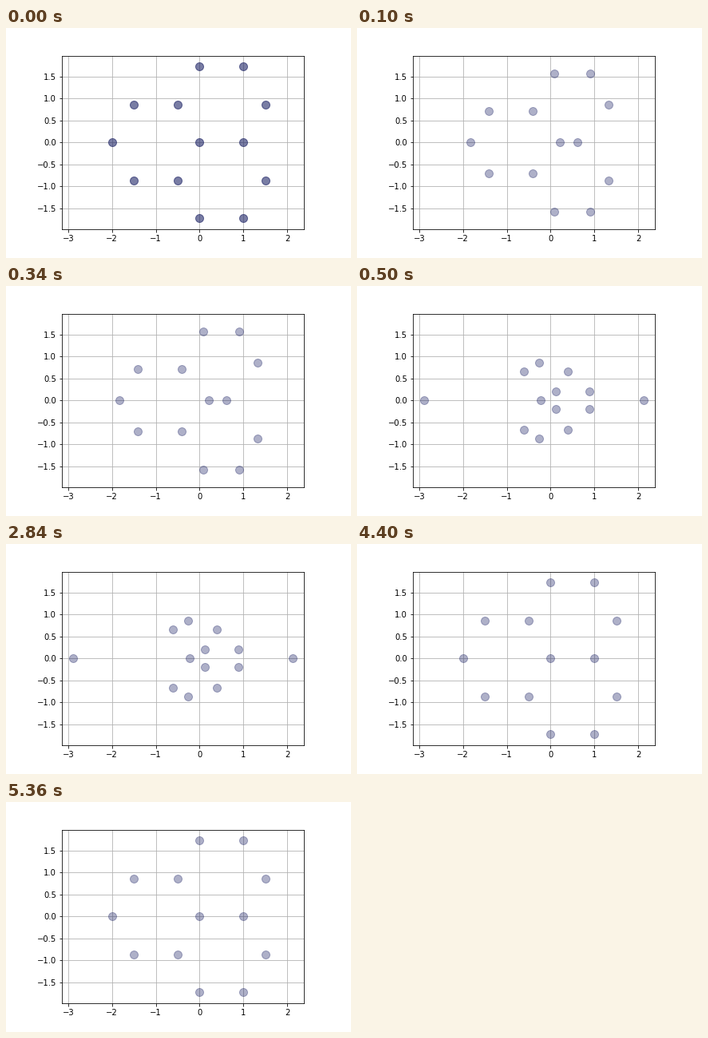
A matplotlib script that plays this animation: 432 px wide and 288 px high, repeating every 6000 ms.

```python
import matplotlib.pyplot as plt
import numpy as np
from matplotlib.animation import FuncAnimation

FRAME_MS = 100
FRAMES = 60
RELAX_START, SETTLE_START, RESET_START = 1, 5, 44
COLOR = "#181e62"
ALPHA = 0.35


def mirrored(axis, upper):
    """Points on the x axis plus a set reflected across it."""
    points = [(x, 0) for x in axis]
    for x, y in upper:
        points += [(x, y), (x, -y)]
    return np.array(points)


H = np.sqrt(3) / 2
lattice = mirrored(
    [-2, 0, 1],
    [(0, 2 * H), (1, 2 * H), (-1.5, H), (-0.5, H), (1.5, H)])
relaxed = mirrored(
    [-1.835, 0.21, 0.615],
    [(0.085, 1.575), (0.905, 1.575), (-1.41, 0.71), (-0.41, 0.71), (1.325, H)])
settled = mirrored(
    [-2.89, -0.225, 2.128],
    [(-0.605, 0.664), (-0.26, H), (0.395, 0.664), (0.125, 0.2), (0.885, 0.2)])

fig = plt.figure(figsize=(6, 4), dpi=72)
fig.subplots_adjust(left=0.125, right=0.9, bottom=0.125, top=0.88)
ax = fig.add_subplot()
ax.set_aspect("equal")
ax.set_xlim(-3.145, 2.379)
ax.set_ylim(-1.982, 1.982)
ax.set_xticks(range(-3, 3))
ax.set_yticks(np.arange(-1.5, 2, 0.5))
ax.grid(True)

dots, overlay = (
    ax.scatter(*lattice.T, s=100, linewidth=1, color=COLOR, alpha=ALPHA, zorder=2.2)
    for _ in range(2))


def positions(frame):
    if RELAX_START <= frame < SETTLE_START:
        return relaxed
    if SETTLE_START <= frame < RESET_START:
        return settled
    return lattice


def update(frame):
    dots.set_offsets(positions(frame))
    overlay.set_visible(frame == 0)  # the opening pose is drawn twice
    return dots, overlay


anim = FuncAnimation(fig, update, frames=FRAMES, interval=FRAME_MS,
                     repeat=True, repeat_delay=0)
plt.show()
```
